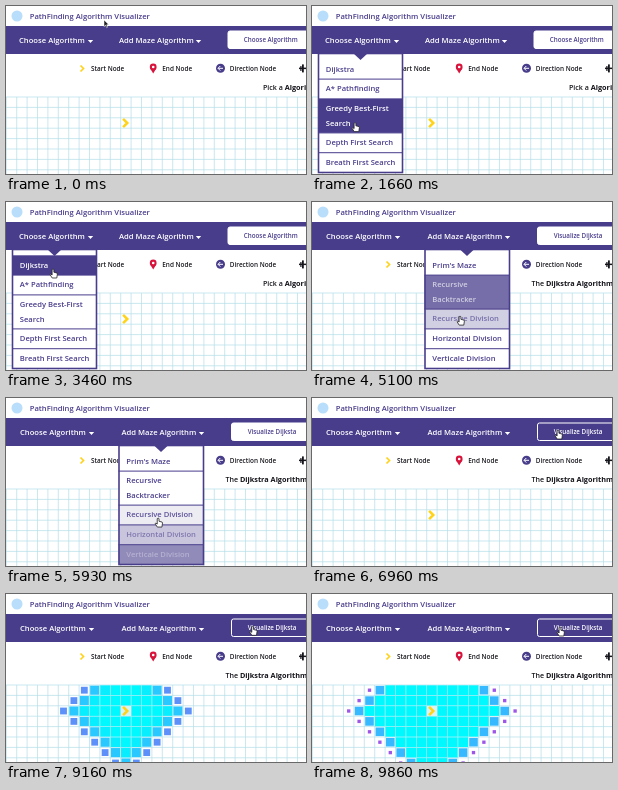
Recreate the animation shown at these times as an HTML page with a canvas. Size 300 by 168 pixels, loop 9900 ms.

```html
<!DOCTYPE html>
<html lang="en">
<head>
<meta charset="utf-8">
<title>Pathfinding</title>
<style>
html, body { margin: 0; width: 100%; height: 100%; overflow: hidden; background: #fff; }
canvas { display: block; }
</style>
</head>
<body>
<canvas width="300" height="168"></canvas>
<script>
const ctx = document.querySelector('canvas').getContext('2d');
const LOOP = 9900, PICK = 3700, SEARCH = 7800;
const PURPLE = '#483d8b', INK = '#15151c', YELLOW = '#ffd31a';
const CELL = 10.4, GRID_TOP = 91, START = { col: 11, row: 2 };

// Pointer path: time, x, y
const path = [
  [0, 98, 14], [350, 98, 15], [700, 50, 32], [900, 47, 56], [1300, 43, 113], [1700, 43, 117],
  [2050, 44, 152], [2400, 45, 153], [3080, 47, 70], [3460, 47, 67], [3760, 47, 64],
  [4050, 72, 36], [4350, 150, 34], [4600, 149, 58], [5100, 148, 114], [5450, 150, 152],
  [5800, 151, 150], [6150, 154, 70], [6350, 165, 34], [6600, 246, 32],
  [8800, 246, 32], [9860, 248, 33]
];

const menus = [
  { x: 6, w: 85, tip: 48.5, items: [['Dijkstra'], ['A* Pathfinding'],
    ['Greedy Best-First', 'Search'], ['Depth First Search'], ['Breath First Search']] },
  { x: 112.5, w: 85.5, tip: 155, items: [["Prim's Maze"], ['Recursive', 'Backtracker'],
    ['Recursive Division'], ['Horizontal Division'], ['Verticale Division']] }
];

const clamp = (v) => Math.max(0, Math.min(1, v));

function pointerAt(t) {
  const i = path.findIndex((p) => p[0] > t);
  if (i < 0) return path[path.length - 1].slice(1);
  const a = path[i - 1], b = path[i], k = (t - a[0]) / (b[0] - a[0]);
  return [a[1] + (b[1] - a[1]) * k, a[2] + (b[2] - a[2]) * k];
}

const inside = ([px, py], x, y, w, h) => px >= x && px < x + w && py >= y && py < y + h;

// Hover strength: share of the last 300 ms spent over the box
function hover(t, ...box) {
  let hits = 0;
  for (let i = 0; i < 20; i++) hits += inside(pointerAt(Math.max(0, t - i * 15)), ...box);
  return hits / 20;
}

function mix(a, b, k) {
  return `rgb(${a.map((v, i) => Math.round(v + (b[i] - v) * k))})`;
}
const fade = (k) => mix([255, 255, 255], [72, 61, 139], k);

function rect(x, y, w, h, color) {
  ctx.fillStyle = color;
  ctx.fillRect(x, y, w, h);
}

function text(str, x, y, size, color, weight = 600, align = 'left') {
  ctx.font = `${weight} ${size}px "Open Sans", "Noto Sans", sans-serif`;
  ctx.textAlign = align;
  ctx.fillStyle = color;
  ctx.fillText(str, x, y);
  return ctx.measureText(str).width;
}

function poly(points, fill, stroke, width = 1) {
  ctx.beginPath();
  points.forEach(([x, y]) => ctx.lineTo(x, y));
  if (fill) {
    ctx.closePath();
    ctx.fillStyle = fill;
    ctx.fill();
  }
  if (stroke) {
    ctx.strokeStyle = stroke;
    ctx.lineWidth = width;
    ctx.stroke();
  }
}

function disc(x, y, r, color) {
  ctx.beginPath();
  ctx.arc(x, y, r, 0, 7);
  ctx.fillStyle = color;
  ctx.fill();
}

function chevron(x, y, s, width) {
  poly([[x - s / 2, y - s], [x + s / 2, y], [x - s / 2, y + s]], null, YELLOW, width);
}

function drawHeader(t, picked) {
  disc(11, 10, 5.5, '#b9defb');
  text('PathFinding Algorithm Visualizer', 23.7, 13.2, 7.65, PURPLE);
  rect(0, 20, 300, 28, PURPLE);
  const navItems = picked
    ? [['Choose Algorithm', 14, 85.5], ['Add Maze Algorithm', 115.5, 195.5]]
    : [['Choose Algorithm', 13, 84.5], ['Add Maze Algorithm', 113, 192.5]];
  for (const [label, x, caret] of navItems) {
    text(label, x, 36.8, 7.65, '#fff');
    poly([[caret - 2.7, 34], [caret + 2.7, 34], [caret, 37]], '#fff');
  }

  const x = picked ? 225.5 : 222, k = hover(t, x, 25, 90, 18);
  ctx.beginPath();
  ctx.roundRect(x, 25, picked ? 81 : 85, 17.5, 2);
  ctx.fillStyle = fade(k);
  ctx.fill();
  ctx.strokeStyle = '#fff';
  ctx.lineWidth = 1;
  ctx.stroke();
  text(picked ? 'Visualize Dijksta' : 'Choose Algorithm', picked ? 266 : 264.7, 36.2, 6.25, fade(1 - k), 600, 'center');
}

function drawLegend(picked) {
  chevron(76, 62.5, 3, 1.7);
  text('Start Node', 85, 65, 6.4, INK);

  poly([[144.2, 62.5], [150.2, 62.5], [147.2, 67.5]], '#d8143c');
  disc(147.2, 61, 3.4, '#d8143c');
  disc(147.2, 61, 1.3, '#fff');
  text('End Node', 156.3, 65, 6.4, INK);

  disc(214.5, 62.3, 4.5, PURPLE);
  poly([[217, 62.3], [212.2, 62.3]], null, '#fff', 1);
  poly([[214.3, 60], [212, 62.3], [214.3, 64.6]], null, '#fff', 1);
  text('Direction Node', 223.8, 65, 6.4, INK);

  rect(293, 61.6, 7, 1.5, INK);
  rect(294.3, 60, 1.2, 5, INK);
  rect(296, 58.4, 1.8, 8, INK);

  const x = picked ? 219.5 : 257;
  const w = text(picked ? 'The ' : 'Pick a ', x, 83.8, 7.1, INK);
  text(picked ? 'Dijkstra Algorithm' : 'Algorithm', x + w, 83.8, 7.3, INK, 700);
}

function drawGrid() {
  ctx.beginPath();
  for (let x = 0.3; x < 300; x += CELL) {
    ctx.moveTo(x, GRID_TOP);
    ctx.lineTo(x, 168);
  }
  for (let y = GRID_TOP; y < 168; y += CELL) {
    ctx.moveTo(0, y);
    ctx.lineTo(300, y);
  }
  ctx.strokeStyle = '#b4dfe8';
  ctx.lineWidth = 0.7;
  ctx.stroke();
}

function visitColor(p) {
  const violet = [180, 66, 226], blue = [70, 165, 255], cyan = [0, 248, 255];
  return p < 0.5 ? mix(violet, blue, p / 0.5) : mix(blue, cyan, (p - 0.5) / 0.5);
}

function drawSearch(t) {
  for (let row = 0; row < 8; row++) {
    for (let col = 0; col < 29; col++) {
      const ring = Math.abs(col - START.col) + Math.abs(row - START.row);
      const age = t - SEARCH - 9.3 * ring ** 2.57;
      if (age < 0) continue;
      const p = clamp(age / 1100), size = (0.18 + 0.82 * p * (2 - p)) * (CELL - 0.6);
      const x = (col + 0.5) * CELL + 0.3, y = GRID_TOP + (row + 0.5) * CELL;
      const color = !ring && age > 1100 ? '#d9f2f2' : visitColor(p);
      rect(x - size / 2, y - size / 2, size, size, color);
    }
  }
  chevron((START.col + 0.5) * CELL - 0.4, GRID_TOP + (START.row + 0.5) * CELL, 4.2, 2.5);
}

function drawMenu(t, { x, w, tip, items }) {
  rect(x, 48, w, 119, '#fff');
  let y = 53.3;
  items.forEach((lines, i) => {
    const h = lines.length > 1 ? 34 : 19.8;
    const k = hover(t, x, y, w, h);
    rect(x, y, w, h, fade(k));
    if (i) rect(x, y - 0.5, w, 1, PURPLE);
    lines.forEach((line, n) => text(line, x + 7.8, y + 12.3 + n * 14.4, 7.62, fade(1 - k)));
    y += h;
  });
  ctx.strokeStyle = PURPLE;
  ctx.lineWidth = 1.6;
  ctx.strokeRect(x + 0.5, 47.5, w - 1, 119);
  poly([[tip - 7, 47.5], [tip + 7, 47.5], [tip, 54]], PURPLE);
}

function drawPointer([x, y], hand) {
  ctx.save();
  ctx.translate(x, y);
  ctx.lineJoin = 'round';
  if (hand) {
    poly([[-0.9, 0.6], [0, 0], [0.9, 0.6], [0.9, 3.2], [4, 4], [4.4, 5], [3.8, 9], [-0.8, 9],
      [-3, 5.6], [-2.2, 5], [-0.9, 6]], '#fff', '#222', 0.8);
  } else {
    poly([[0, 0], [0, 6.6], [1.6, 5.2], [2.7, 7.6], [3.7, 7.1], [2.7, 4.8], [4.7, 4.6], [0, 0]], '#222', '#fff', 0.5);
  }
  ctx.restore();
}

function draw(t) {
  const picked = t >= PICK, pointer = pointerAt(t);
  rect(0, 0, 300, 168, '#fff');
  drawHeader(t, picked);
  drawLegend(picked);
  drawGrid();
  drawSearch(t);
  const open = menus.find((m) => inside(pointer, m.x, 25, m.w, 142));
  if (open) drawMenu(t, open);
  drawPointer(pointer, open || inside(pointer, 222, 25, 90, 18));
}

function tick() {
  draw(performance.now() % LOOP);
  requestAnimationFrame(tick);
}
tick();
</script>
</body>
</html>
```
